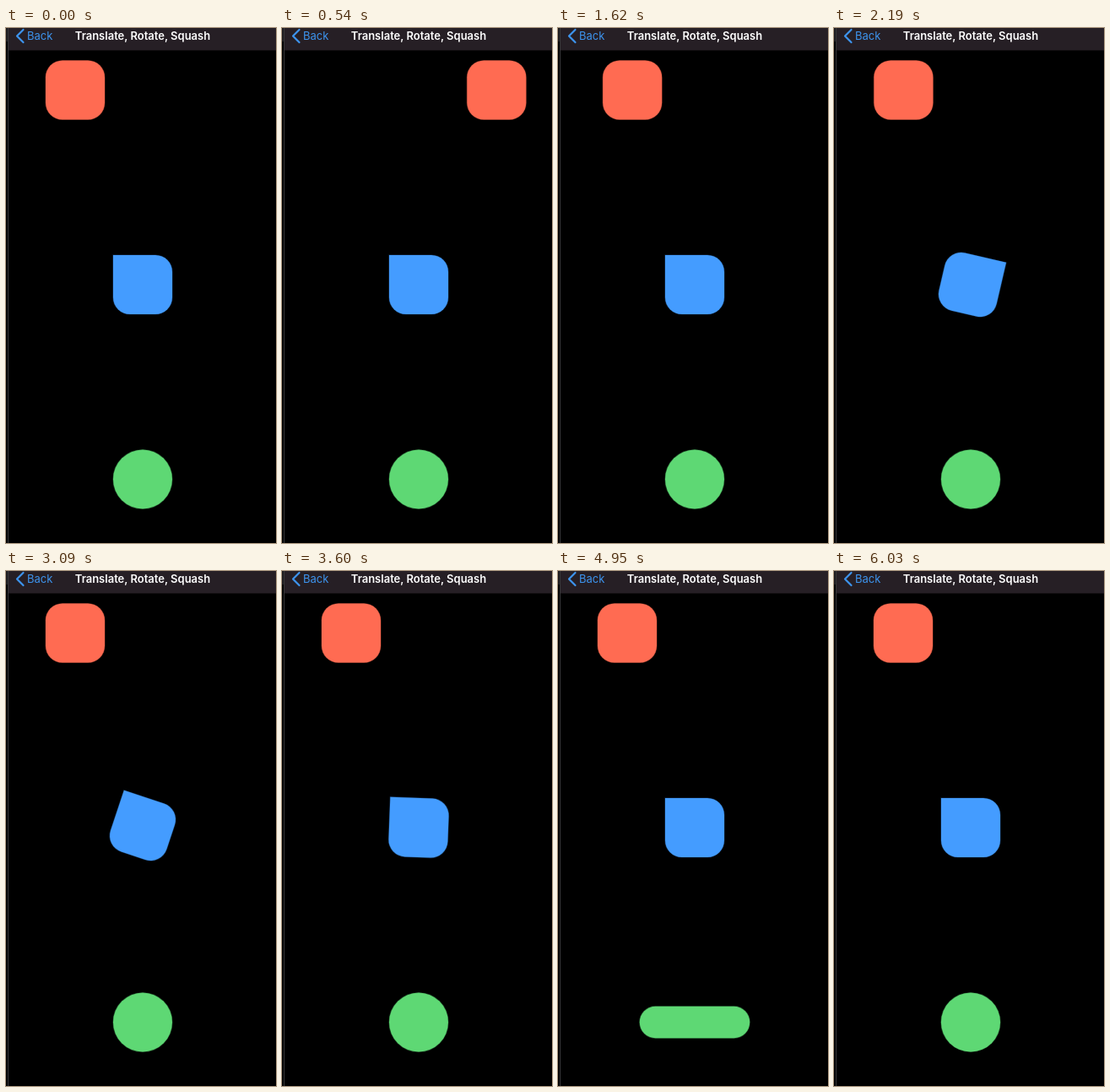
Recreate the animation shown at these times as an HTML page. Size 320 by 610 pixels, loop 6.06 s.

```html
<!DOCTYPE html>
<html lang="en">
<head>
<meta charset="utf-8">
<style>
  html, body { margin: 0; width: 100%; height: 100%; overflow: hidden; background: #000; }
  svg { display: block; width: 100vw; height: 100vh; }
  text { font-family: Inter, Roboto, sans-serif; font-size: 13px; }
  .shape { stroke-opacity: .3; stroke-width: 1.2; }
</style>
</head>
<body>
<svg viewBox="0 0 320 610">
  <rect width="320" height="610" fill="#000"/>
  <rect x="3" width="317" height="26.5" fill="#261f25"/>
  <rect y="0" width="2" height="16" fill="#1c1b1e"/>
  <rect x="2" width="1" height="610" fill="#38383a"/>
  <path d="M20.5 2 L13 9.5 L20.5 17" fill="none" stroke="#3d94ee" stroke-width="2.2" stroke-linecap="round" stroke-linejoin="round"/>
  <text x="25" y="14" fill="#3d94ee">Back</text>
  <text x="162" y="14" fill="#fff" font-weight="600" text-anchor="middle">Translate, Rotate, Squash</text>
  <rect id="slider" class="shape" x="-35" y="-35" width="70" height="70" rx="20" fill="#ff6b52" stroke="#ff6b52"/>
  <path id="spinner" class="shape" d="M-35 -35 H15 A20 20 0 0 1 35 -15 V15 A20 20 0 0 1 15 35 H-15 A20 20 0 0 1 -35 15 Z" fill="#449cff" stroke="#449cff"/>
  <rect id="squasher" class="shape" fill="#5ed874" stroke="#5ed874"/>
</svg>
<script>
const LOOP = 6060, SIZE = 70;
const FREQ = 0.01144;  // damped frequency, rad per ms
const DECAY = 0.475;   // decay per radian
const [slider, spinner, squasher] =
  ['slider', 'spinner', 'squasher'].map(id => document.getElementById(id));

// Step response of an underdamped spring released at `start`.
function spring(t, start) {
  if (t <= start) return 0;
  const a = (t - start) * FREQ;
  return 1 - Math.exp(-DECAY * a) * (Math.cos(a) + DECAY * Math.sin(a));
}

const outAndBack = (t, out, back) => spring(t, out) - spring(t, back);

function draw(t) {
  const slide = outAndBack(t, 146, 1123);
  slider.setAttribute('transform', `translate(${82 + 160 * slide} 73.5)`);

  const turn = outAndBack(t, 1977, 2951);
  spinner.setAttribute('transform', `translate(162 304) rotate(${90 * turn})`);

  const squash = outAndBack(t, 3931, 4906);
  const w = SIZE * (1 + squash);
  const h = SIZE * (squash > 0 ? 1 / (1 + squash) : 1 - squash / 2);
  const box = { x: 162 - w / 2, y: 534.5 - h / 2, width: w, height: h, rx: Math.min(w, h) / 2 };
  for (const key in box) squasher.setAttribute(key, box[key]);
}

const begin = performance.now();
function tick() {
  draw((performance.now() - begin) % LOOP);
  requestAnimationFrame(tick);
}
draw(0);
requestAnimationFrame(tick);
</script>
</body>
</html>
```
